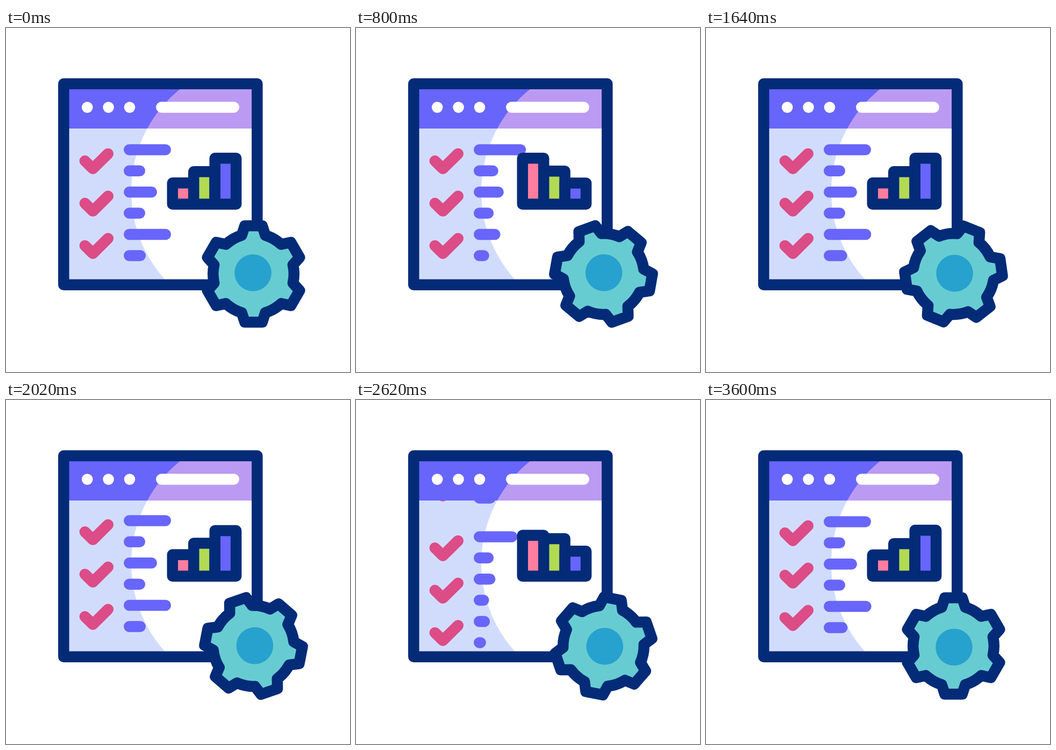
An HTML page that plays this animation: 640x640 px, repeating every 3.62 s.

```html
<!DOCTYPE html>
<html lang="en">
<head>
<meta charset="utf-8">
<title>Task dashboard</title>
<style>
  html, body { margin: 0; width: 100%; height: 100%; overflow: hidden; background: #fff; }
  svg { display: block; width: 100%; height: 100%; }
  .line { fill: none; stroke-width: 20.5; stroke-linecap: round; stroke-linejoin: round; }
  .navy { stroke: #032b78; stroke-width: 20.5; stroke-linejoin: round; }
</style>
</head>
<body>
<svg viewBox="0 0 640 640">
  <defs>
    <clipPath id="listClip"><rect x="117" y="187" width="341" height="281"/></clipPath>
    <clipPath id="paneClip"><rect x="112" y="109" width="350" height="364"/></clipPath>
    <clipPath id="headClip"><rect x="112" y="109" width="350" height="78"/></clipPath>
  </defs>
  <rect x="112" y="109" width="350" height="364" fill="#d1dcfd"/>
  <circle cx="478.5" cy="304.2" r="245.5" fill="#fff" clip-path="url(#paneClip)"/>
  <rect x="112" y="109" width="350" height="78" fill="#6865fa"/>
  <circle cx="478.5" cy="304.2" r="245.5" fill="#bb9af3" clip-path="url(#headClip)"/>
  <g fill="#fff">
    <circle cx="151.2" cy="147.6" r="10.3"/>
    <circle cx="190.6" cy="147.6" r="10.3"/>
    <circle cx="230" cy="147.6" r="10.3"/>
  </g>
  <path class="line" stroke="#fff" d="M289.3 147.6H423.7"/>
  <g id="list" clip-path="url(#listClip)"></g>
  <rect class="navy" x="107.3" y="103.8" width="360" height="374" fill="none"/>
  <g id="chart"></g>
  <g id="gear">
    <path id="cog" class="navy" fill="#67ccd1"/>
    <circle cx="-1" cy="-2.2" r="34.3" fill="#27a1ce"/>
  </g>
</svg>
<script>
const LOOP = 3620, SECOND = 1980;
const SCROLL = 800, PITCH = 269;
const GROW = 800, SETTLE = 400, OVERSHOOT = 12.3;
const ROW_TOP = 226.4, ROW_GAP = 39.4;
const CAP = 10.25, LEFT = 229.3, DOT_END = 241;

// resting right edge and growth delay of each row
const ROWS = [[307, 95], [259, 240], [281, 320], [259, 400], [307, 480], [260, 560]];

// inner top of each bar, one key every 400 ms
const BAR_STEP = 400, BAR_BASE = 327.8;
const BARS = [
  { x: 309.8, fill: '#ff7d9f', tops: [298.5, 279.5, 252.5, 279, 298.5] },
  { x: 349.2, fill: '#b2da52', tops: [277.5, 252.8, 276.5, 298.3, 277.5] },
  { x: 388.7, fill: '#6865fa', tops: [252.5, 278, 298.8, 278, 252.5] }
];

const byId = id => document.getElementById(id);
const clamp = v => Math.min(1, Math.max(0, v));
const ease = v => { const s = clamp(v); return s * s * (3 - 2 * s); };
const mix = (a, b, k) => a + (b - a) * k;

function add(parent, tag, attrs) {
  const el = document.createElementNS('http://www.w3.org/2000/svg', tag);
  for (const key in attrs) el.setAttribute(key, attrs[key]);
  return parent.appendChild(el);
}

function makeSet() {
  const group = add(byId('list'), 'g', {});
  const rows = ROWS.map((row, i) => {
    const y = ROW_TOP + i * ROW_GAP;
    if (i % 2 === 0) {
      add(group, 'path', {
        class: 'line', stroke: '#dc4c86',
        d: `M146.8 ${y + 20.9}L161.6 ${y + 35.4}L189.8 ${y + 7.5}`
      });
    }
    return add(group, 'line', {
      class: 'line', stroke: '#6865fa', x1: LEFT, x2: row[0] - CAP, y1: y, y2: y
    });
  });
  return { group, rows };
}

function cogPath() {
  const tooth = [[-22, -72], [-16.2, -89.6], [16.2, -89.6], [22, -72]];
  let d = '';
  for (let i = 0; i < 6; i++) {
    const a = i * Math.PI / 3, c = Math.cos(a), s = Math.sin(a);
    tooth.forEach(([x, y], j) => {
      const cmd = j ? 'L' : i ? 'A75.3 75.3 0 0 1 ' : 'M';
      d += `${cmd}${(x * c - y * s).toFixed(2)} ${(x * s + y * c).toFixed(2)}`;
    });
  }
  return d + 'A75.3 75.3 0 0 1 -22 -72Z';
}

const oldSet = makeSet(), newSet = makeSet();
const bars = BARS.map(b => add(byId('chart'), 'rect', {
  class: 'navy', x: b.x, width: 39.4, fill: b.fill
}));
byId('cog').setAttribute('d', cogPath());

function rowEnd([rest, delay], t) {
  const peak = rest + OVERSHOOT;
  const grown = mix(DOT_END, peak, ease((t - delay) / GROW));
  return grown - OVERSHOOT * ease((t - delay - GROW) / SETTLE);
}

function barTop(tops, t) {
  const pos = Math.min(t / BAR_STEP, tops.length - 1);
  const i = Math.min(Math.floor(pos), tops.length - 2);
  return mix(tops[i], tops[i + 1], ease(pos - i));
}

function draw(time) {
  const t = time < SECOND ? time : time - SECOND;
  const shift = PITCH * ease(t / SCROLL);
  oldSet.group.setAttribute('transform', `translate(0 ${-shift})`);
  newSet.group.setAttribute('transform', `translate(0 ${PITCH - shift})`);
  newSet.rows.forEach((el, i) => el.setAttribute('x2', rowEnd(ROWS[i], t) - CAP));
  bars.forEach((el, i) => {
    const y = barTop(BARS[i].tops, t) - CAP;
    el.setAttribute('y', y);
    el.setAttribute('height', BAR_BASE - y);
  });
  byId('gear').setAttribute('transform', `translate(460.5 457.6) rotate(${time * 0.05})`);
}

let start = null;
function tick(now) {
  if (start === null) start = now;
  draw((now - start) % LOOP);
  requestAnimationFrame(tick);
}
draw(0);
requestAnimationFrame(tick);
</script>
</body>
</html>
```
